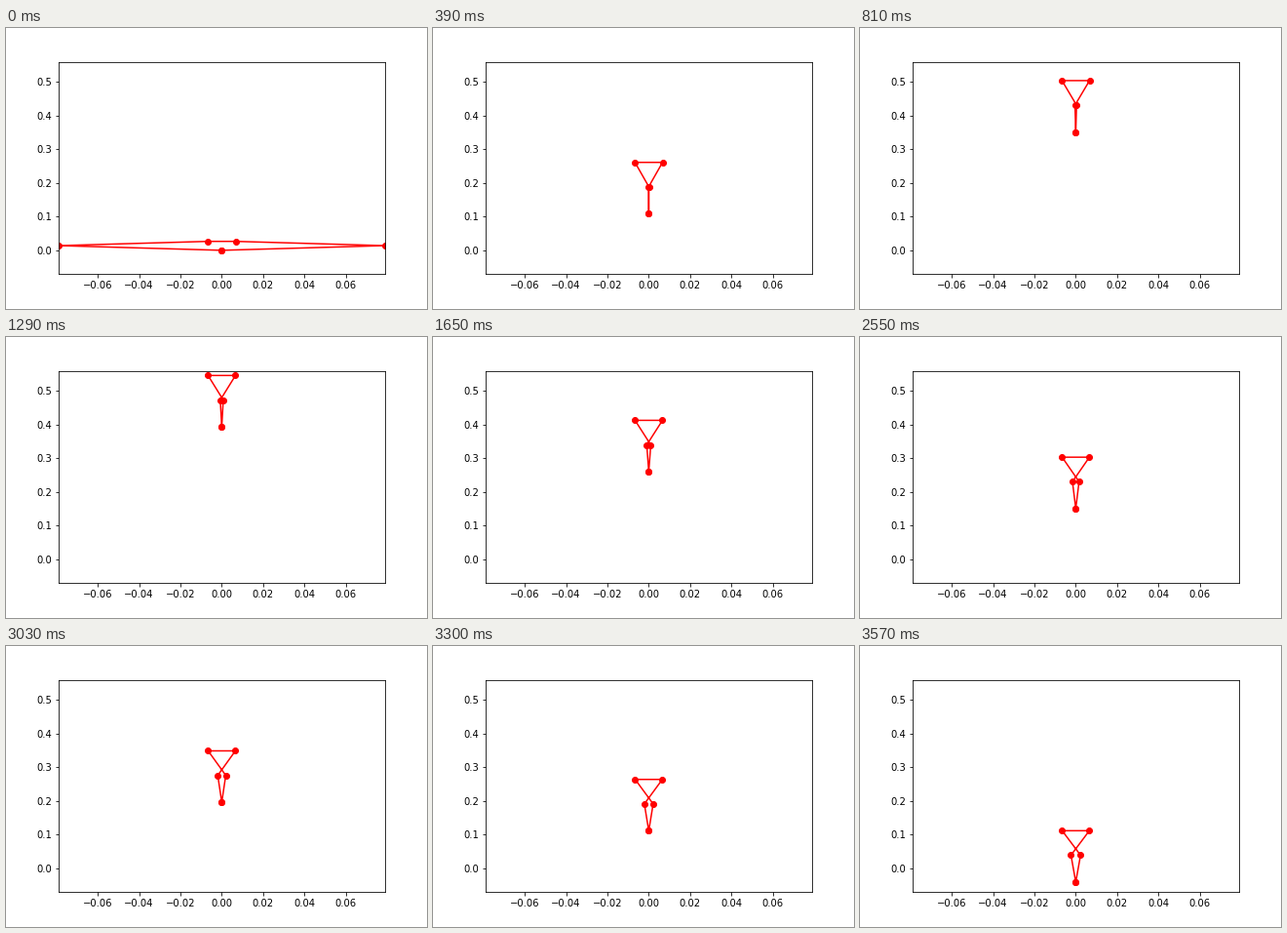
Animation, 432 px wide and 288 px high, one loop 3600 ms. Source, as a matplotlib script:

```python
import numpy as np
import matplotlib.pyplot as plt
from matplotlib.animation import FuncAnimation

FRAMES = 120
INTERVAL = 30   # ms on screen
DT = 0.01       # simulated seconds per frame
G = 9.81

SHIN = 0.08
THIGH = 0.0732

# (peak height, time of peak) of the two flights
JUMP = (0.407, 0.3768)
REBOUND = (0.2088, 0.959)


def hang(peak):
    """Time from the peak of a flight down to the ground."""
    return np.sqrt(2 * peak / G)


def flight(t, peak, t_peak):
    return peak - G / 2 * (t - t_peak) ** 2


def contact(t, speed, omega=35.74, damping=3.8):
    """Damped spring response of the ground after an impact."""
    return -1.03 * speed / omega * np.exp(-damping * t) * np.sin(omega * t)


TAKEOFF = JUMP[1] - hang(JUMP[0])
LANDING = JUMP[1] + hang(JUMP[0])
BOUNCE = REBOUND[1] - hang(REBOUND[0])
LANDING_2 = REBOUND[1] + hang(REBOUND[0])


def foot_height(t):
    if t < TAKEOFF:
        u = t / TAKEOFF
        return -G * hang(JUMP[0]) * TAKEOFF * u ** 1.3 * (1 - u)
    if t < LANDING:
        return flight(t, *JUMP)
    if t < BOUNCE:
        return contact(t - LANDING, G * hang(JUMP[0]))
    if t < LANDING_2:
        return flight(t, *REBOUND)
    return contact(t - LANDING_2, G * hang(REBOUND[0]))


def knee_offset(t):
    """Right knee relative to the foot: fast extension, then slow drift."""
    if t < TAKEOFF:
        angle = np.radians(10 + 80 * (t / TAKEOFF) ** 1.15)
        return SHIN * np.cos(angle), SHIN * np.sin(angle)
    x = -0.0021 * (t - TAKEOFF)
    return x, np.sqrt(SHIN ** 2 - x ** 2)


def pose(t):
    foot = foot_height(t)
    knee_x, rise = knee_offset(t)
    knee = foot + rise
    hip_x = 0.00668 - 0.0001 * t
    hip = knee + np.sqrt(THIGH ** 2 - (hip_x - knee_x) ** 2)
    xs = [0, knee_x, hip_x, -hip_x, -knee_x, 0]
    ys = [foot, knee, hip, hip, knee, foot]
    return xs, ys


fig = plt.figure(figsize=(6, 4), dpi=72)
ax = fig.add_axes([0.125, 0.125, 0.775, 0.755])
ax.set_xlim(-0.0789, 0.0789)
ax.set_ylim(-0.07, 0.56)
leg, = ax.plot([], [], "ro-")


def update(i):
    leg.set_data(*pose(i * DT))
    return leg,


anim = FuncAnimation(fig, update, frames=FRAMES, interval=INTERVAL,
                     repeat=True, repeat_delay=0)
plt.show()
```
